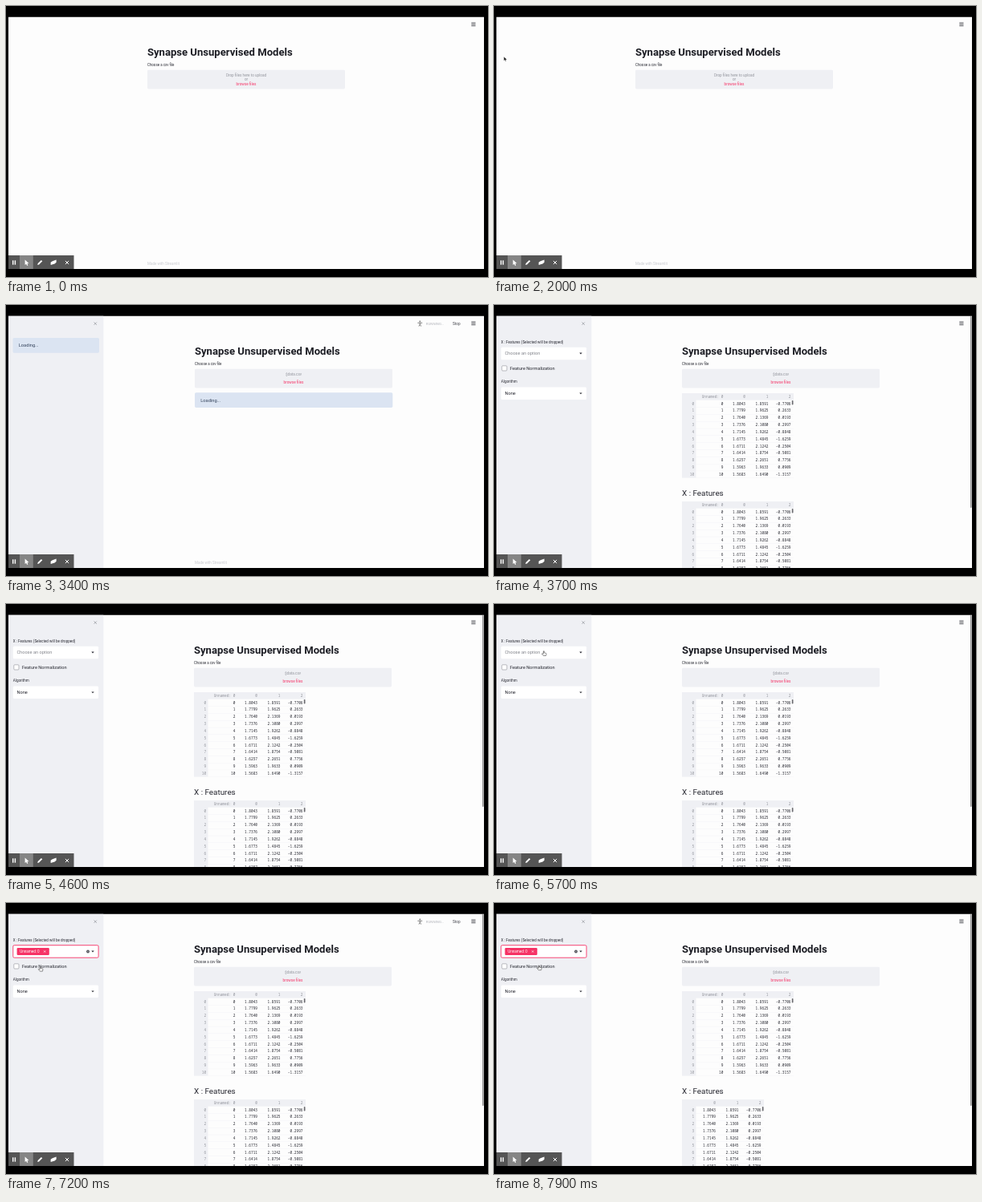
An HTML page for the animation above (8 s loop, 600x338 px).

```html
<!DOCTYPE html>
<html>
<head>
<meta charset="utf-8">
<style>
html, body { margin: 0; width: 100%; height: 100%; overflow: hidden; background: #000; }
svg { display: block; width: 600px; height: 338px; font-family: Roboto, "Open Sans", sans-serif; fill: #262730; }
.mono { font: 4.45px "Noto Sans Mono", "DejaVu Sans Mono", monospace; text-anchor: end; }
</style>
</head>
<body>
<svg id="stage" viewBox="0 0 600 338"></svg>
<script>
const PINK = '#f63366', GREY = '#92949c', PANEL = '#eff0f4', DARK = '#262730';
const STEP = 100, LOOP = 8000;
const stage = document.getElementById('stage');

const DATA = [
  ['1.8043', '1.8591', '-0.7706'], ['1.7799', '1.9625', '0.2633'],
  ['1.7640', '2.1369', '0.0193'], ['1.7376', '2.1080', '0.2997'],
  ['1.7145', '1.9262', '-0.8848'], ['1.6773', '1.4845', '-1.6259'],
  ['1.6711', '2.1242', '-0.2504'], ['1.6414', '1.8754', '-0.5081'],
  ['1.6257', '2.2651', '0.7756'], ['1.5963', '1.9633', '0.0909'],
  ['1.5683', '1.6490', '-1.3157']
];

const text = (x, y, s, size, fill = DARK, more = '') =>
  `<text x="${x}" y="${y}" font-size="${size}" fill="${fill}" ${more}>${s}</text>`;
const rect = (x, y, w, h, fill, r = 0, more = '') =>
  `<rect x="${x}" y="${y}" width="${w}" height="${h}" fill="${fill}" rx="${r}" ${more}/>`;
const path = (d, fill, stroke = 'none', width = 1) =>
  `<path d="${d}" fill="${fill}" stroke="${stroke}" stroke-width="${width}"/>`;
const move = (x, y, s) => `<g transform="translate(${x} ${y})">${s}</g>`;
const cross = (x, y, r, color, width) =>
  path(`M${x - r} ${y - r}l${2 * r} ${2 * r}m0 ${-2 * r}l${-2 * r} ${2 * r}`, 'none', color, width);
const caret = (x, y) => path(`M${x - 1.7} ${y - .8}h3.4l-1.7 1.8z`, DARK);
const mix = (a, b, k) => a + (b - a) * k;
const ease = k => k * k * (3 - 2 * k);

// Position on a list of [time, x, y] stops
function along(stops, t) {
  const n = stops.findIndex(s => s[0] > t);
  if (n < 0) return stops[stops.length - 1].slice(1);
  const a = stops[Math.max(0, n - 1)], b = stops[n];
  const k = n ? ease((t - a[0]) / (b[0] - a[0])) : 0;
  return [mix(a[1], b[1], k), mix(a[2], b[2], k)];
}

function uploader(t) {
  const hot = t >= 2500 && t < 3200, loaded = t >= 3200;
  const soft = hot ? '#a96f82' : GREY;
  const mid = 'text-anchor="middle"';
  return text(176, 61.7, 'Synapse Unsupervised Models', 13.08, '#1c1d24', 'font-weight="700"') +
    text(176, 75.2, 'Choose a csv file', 4.45) +
    rect(176, 79.7, 246, 23.8, hot ? '#fa97b1' : PANEL, 1.4, hot ? 'stroke="#c9607f" stroke-width=".6"' : '') +
    (loaded
      ? text(299, 88.2, '$data.csv', 4.65, GREY, mid)
      : text(299, 87.5, 'Drop files here to upload', 4.65, soft, mid) + text(299, 92.9, 'or', 4.65, soft, mid)) +
    text(299, loaded ? 97.6 : 98.6, 'browse files', 4.65, PINK, mid);
}

const loading = (x, y, w) =>
  rect(x, y, w, 18.7, '#dbe4f2', 1.6) + text(x + 7.3, y + 11.3, 'Loading...', 5.7, '#34435c');

// Table with its top left corner at 0,0
function table(unnamed) {
  const shift = unnamed ? 0 : -37, right = 139 + shift, cols = [79, 107.5, 135.5];
  const cell = (x, y, s, fill) => `<text x="${x}" y="${y}" fill="${fill}">${s}</text>`;
  let s = rect(0, 0, right, 8.6, PANEL) + rect(0, 0, 17.5, 105.6, PANEL);
  if (unnamed) s += cell(51.3, 6, 'Unnamed: 0', GREY);
  cols.forEach((x, c) => s += cell(x + shift, 6, c, GREY));
  DATA.forEach((row, i) => {
    const y = 14.6 + i * 8.82;
    s += rect(17.5, y + 2.8, right - 17.5, .3, '#ececf0') + cell(15.2, y, i, GREY);
    if (unnamed) s += cell(51.3, y, i, DARK);
    row.forEach((v, c) => s += cell(cols[c] + shift, y, v, DARK));
  });
  return `<g class="mono">${s}</g>` + rect(right - 2.2, 9, 1.7, 5.6, '#6b6b70', .8);
}

function select(y, label, focus) {
  return rect(8.8, y, 106.3, 15.5, '#fff', 1.5, focus ? `stroke="${PINK}" stroke-width=".9"` : '') +
    caret(108, y + 7.7) + (label ? text(13.4, y + 9.6, label, 5.65, label === 'None' ? DARK : '#83858c') : '');
}

function menu(t) {
  const hover = t >= 6200 && t < 6700 ? 1 : 0;
  return `<g style="filter:drop-shadow(0 1px 2px #0005)">${rect(8.6, 71, 106.4, 64.6, '#fff', 1.5)}</g>` +
    ['Unnamed: 0', '0', '1', '2'].map((s, i) =>
      text(13.5, 83.5 + i * 14.6, s, 5.65, i === hover ? '#3c3d46' : '#999ba2')).join('');
}

function tag() {
  return rect(13.6, 56, 40.2, 8.9, PINK, 1.2) + text(17.2, 62, 'Unnamed: 0', 4.6, '#fff') +
    cross(48.2, 60.5, 1.1, '#fff', .7) +
    `<circle cx="102" cy="60.5" r="1.9" fill="#44454d"/>` + cross(102, 60.5, .8, '#fff', .5);
}

function sidebar(t) {
  const open = t >= 5800 && t < 6900, picked = t >= 6900;
  let s = rect(3, 13.5, 118.3, 314.5, PANEL) + cross(111.2, 23.2, 1.7, '#8f9198', .7);
  if (t < 3600) return s + loading(8.5, 41, 107.5);
  return s + text(8.8, 47.6, 'X : Features (Selected will be dropped)', 4.57) +
    select(52.7, picked ? '' : 'Choose an option', open || picked) + (picked ? tag() : '') +
    rect(9.8, 75.8, 6.2, 6.2, '#fff', 1, 'stroke="#8d8f96" stroke-width=".6"') +
    text(20, 80.8, 'Feature Normalization', 5.65) +
    text(8.8, 97.1, 'Algorithm', 4.57) + select(102.5, 'None') + (open ? menu(t) : '');
}

function running() {
  return `<circle cx="515.3" cy="20.4" r=".9" fill="#777"/>` +
    path('M512.4 22.3h5.8M515.3 22v2l-1.3 2.6M515.3 24l1.3 2.6', 'none', '#777', .9) +
    text(522.8, 24.8, 'RUNNING...', 4.4, '#b4b6bc') + text(556, 24.6, 'Stop', 4.7, '#44454d');
}

function toolbar() {
  return rect(3, 311, 81.5, 17, '#555') + rect(17, 311, 16.8, 17, '#858585') +
    rect(8, 317.3, 1.4, 5.4, '#fff') + rect(10.7, 317.3, 1.4, 5.4, '#fff') +
    path('M23.6 316.4v6.6l1.6-1.3 1 2.2 1.2-.6-1-2 2-.3z', '#fff') +
    path('M39.2 323l.5-1.9 4.2-4.2 1.4 1.4-4.2 4.2z', '#fff') +
    path('M55.6 323v-3.2l2.2-1.6 4.8-1.6v3.2l-2 1.7z', '#fff') +
    cross(76, 320, 2.1, '#fff', 1);
}

const arrow = path('M0 0v5l1.2-1 .8 1.8.9-.4-.8-1.7h1.7z', '#111', '#fff', .3);
const hand = path('M-.6 -2.4q.6-.7 1.1 0v2l2.2.5q.6.2.5.9l-.5 2.2h-3.2l-2-2.4q.2-.9 1.9.1z', '#fff', '#333', .55);

function pointer(t) {
  if (t >= 300 && t < 2300) return move(12.3, 63.2, arrow);
  if (t < 4900) return '';
  const [x, y] = along([[4900, 88, 37], [5600, 62, 61], [5900, 62, 62], [6400, 65, 99],
    [6500, 65, 99], [6800, 42, 82], [7100, 42, 82], [7800, 56, 80.5]], t);
  return move(x, y, t < 5400 ? arrow : hand);
}

function draw(t) {
  const slide = t < 3200 ? 0 : Math.min(1, ease(Math.min(1, (t - 3100) / 200)));
  const full = t >= 3600;
  const left = full ? 58 : 59 * slide;
  let page = rect(3, 13.5, 592, 314.5, '#fdfdfd') + move(left, 0, uploader(t));
  if (full) {
    page += move(234, 110, table(true)) + text(234, 238.4, 'X : Features', 9.9) +
      move(234, 245, table(t < 7600)) + rect(593, 14, 1.6, 239, '#8a8a8a', .8);
  } else {
    page += text(176 + left, 323.2, 'Made with Streamlit', 4.5, '#c9cad0');
    if (t >= 3300) page += loading(235, 109.2, 246.3);
  }
  if (t >= 3300 && !full || t >= 7000 && t < 7700) page += running();
  page += [20.9, 22.8, 24.7].map(y => rect(579.3, y - .4, 5.2, .95, '#55565c')).join('');
  if (slide) page += move(-118 * (1 - slide), 0, sidebar(t));
  stage.innerHTML = '<clipPath id="page"><rect x="3" y="13.5" width="592" height="314.5"/></clipPath>' +
    rect(0, 0, 600, 338, '#000') + `<g clip-path="url(#page)">${page}${toolbar()}${pointer(t)}</g>`;
}

let shown = -1;
function tick() {
  const t = Math.floor(performance.now() % LOOP / STEP) * STEP;
  if (t !== shown) draw(shown = t);
  requestAnimationFrame(tick);
}
tick();
</script>
</body>
</html>
```
